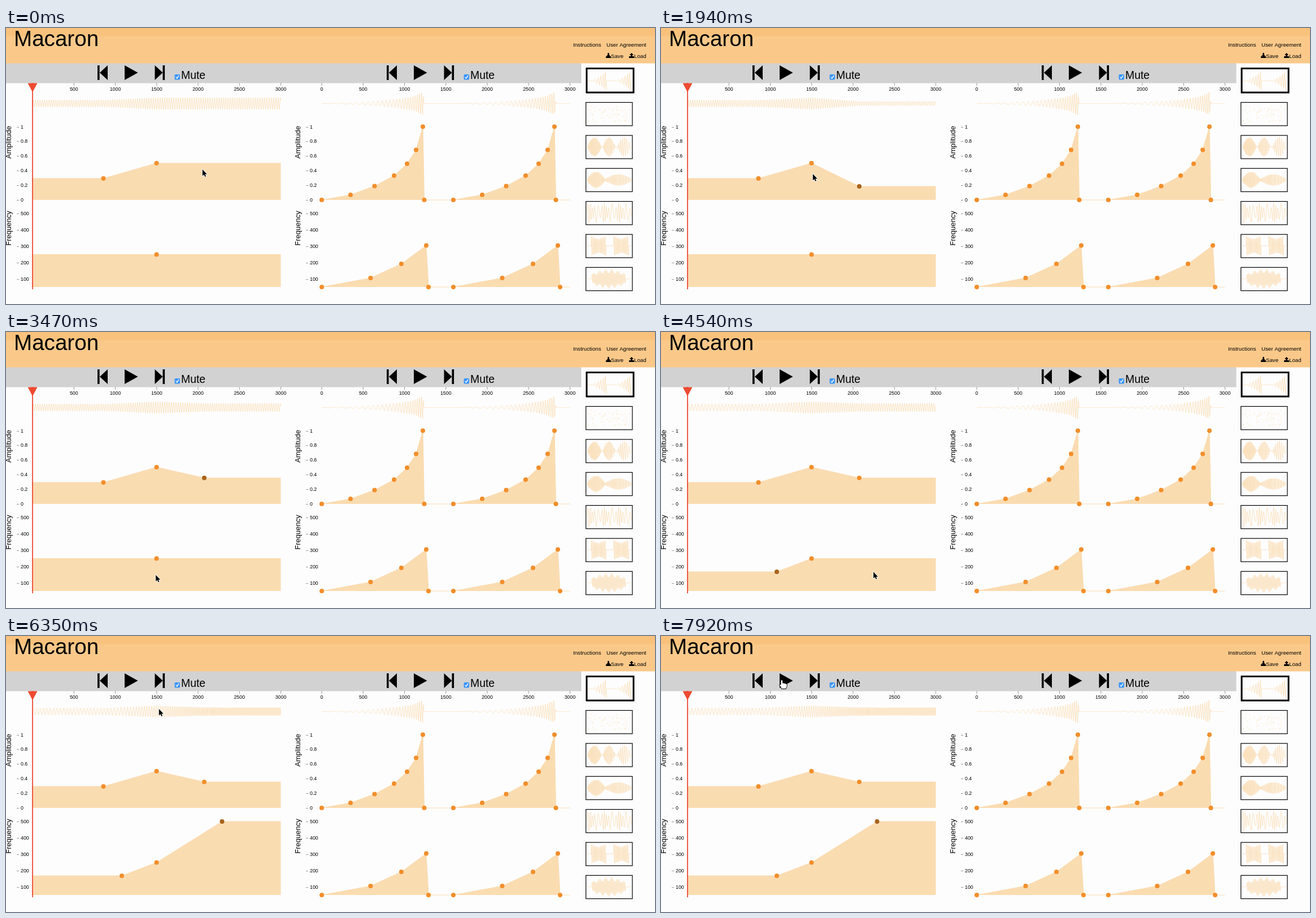
Write an HTML page with a canvas that moves like this. It is 1149 px wide and 488 px high and loops after 8 s.

```html
<!DOCTYPE html>
<html lang="en">
<head>
<meta charset="utf-8">
<style>
html, body { margin: 0; width: 100%; height: 100%; overflow: hidden; background: #fdfdfd; }
canvas { display: block; }
</style>
</head>
<body>
<canvas id="stage" width="1149" height="488"></canvas>
<script>
const g = document.getElementById('stage').getContext('2d');
const LOOP = 8000, X0 = 47, X1 = 486.5, PANEL = 512, LAG = 90;
const AMP0 = 304, AMP_H = 129.5, FREQ0 = 458, HZ = 0.289;
const FILL = '#fadcb1', DOT = '#f28e2b', DARK = '#a9631c';

// Pointer moves: start, end, and the place reached
const moves = [
  [0, 1, 347, 249], [870, 1400, 351, 280], [1900, 1940, 268, 257],
  [2000, 2400, 159, 212], [2600, 2680, 271, 229], [2740, 3050, 351, 258],
  [3200, 3500, 262, 433], [3650, 4100, 205, 424], [4360, 4565, 382, 423],
  [5420, 6060, 377, 309], [6230, 6340, 270, 128], [6530, 6820, 217, 90],
  [6990, 7740, 213, 77]
];

const clamp = (v, lo, hi) => Math.min(hi, Math.max(lo, v));

function pointerAt(t) {
  let [, , x, y] = moves[0];
  for (const [from, to, toX, toY] of moves) {
    const u = clamp((t - from) / (to - from), 0, 1), e = u * u * (3 - 2 * u);
    x += (toX - x) * e;
    y += (toY - y) * e;
  }
  return [x, y];
}

function level(pts, x) {
  if (x <= pts[0][0]) return pts[0][1];
  for (let i = 1; i < pts.length; i++) {
    const [a, b] = [pts[i - 1], pts[i]];
    if (x <= b[0]) return a[1] + (b[1] - a[1]) * (x - a[0]) / (b[0] - a[0]);
  }
  return pts[pts.length - 1][1];
}

const rect = (color, x, y, w, h) => { g.fillStyle = color; g.fillRect(x, y, w, h); };

function poly(color, ...pts) {
  g.fillStyle = color;
  g.beginPath();
  for (const p of pts) g.lineTo(p[0], p[1]);
  g.closePath();
  g.fill();
}

function line(color, width, ...pts) {
  g.strokeStyle = color;
  g.lineWidth = width;
  g.beginPath();
  for (const p of pts) g.lineTo(p[0], p[1]);
  g.stroke();
}

function text(s, x, y, size, align = 'left') {
  g.font = size + 'px "Liberation Sans", Arial, sans-serif';
  g.textAlign = align;
  g.fillStyle = '#000';
  g.fillText(s, x, y);
}

// amp is a height in pixels, rate the number of cycles per pixel
function wave(from, to, mid, amp, rate) {
  const step = 0.25, pts = [];
  let phase = 0;
  for (let x = from; x <= to; x += step) {
    pts.push([x, mid - amp(x) * Math.sin(phase)]);
    phase += 2 * Math.PI * rate(x) * step;
  }
  line('#fad7a6', 0.7, ...pts);
}

function curve(pts, from, to, base) {
  const edge = [[from, level(pts, from)], ...pts, [to, level(pts, to)]];
  poly(FILL, [from, base], ...edge, [to, base]);
  line(FILL, 1, ...edge);
  for (const [x, y, dark] of pts) {
    g.fillStyle = dark ? DARK : DOT;
    g.beginPath();
    g.arc(x, y, 4, 0, 7);
    g.fill();
  }
}

function signal(dx, amps, freqs) {
  const from = X0 + dx, to = X1 + dx;
  wave(from, to, 133.5, x => (AMP0 - level(amps, x)) / AMP_H * 20.5,
    x => (50 + (FREQ0 - level(freqs, x)) / HZ) / 1000);
  curve(amps, from, to, AMP0);
  curve(freqs, from, to, FREQ0);
}

function sideways(s, x, y) {
  g.save();
  g.translate(x, y);
  g.rotate(-Math.PI / 2);
  text(s, 0, 0, 13, 'center');
  g.restore();
}

function panel(dx) {
  g.save();
  g.translate(dx, 0);
  rect('#000', 162, 66, 3.6, 26);
  poly('#000', [166, 79], [180, 66], [180, 92]);
  poly('#000', [210, 66], [233.5, 79], [210, 92]);
  poly('#000', [263.5, 66], [277.5, 79], [263.5, 92]);
  rect('#000', 277.5, 66, 3.6, 26);
  g.fillStyle = '#3b94f7';
  g.beginPath();
  g.roundRect(298.5, 82, 9.5, 9.5, 2);
  g.fill();
  line('#fff', 1.4, [300.8, 87], [302.7, 89.2], [306, 84]);
  text('Mute', 310, 90, 19.4);

  for (let ms = dx ? 0 : 500; ms <= 3000; ms += 500) {
    const x = X0 + ms * 0.1465;
    rect('#999', x - 0.5, 97, 1, 5);
    text(ms, x, 111, 8.8, 'center');
  }
  const mark = (label, y) => {
    rect('#999', 19, Math.round(y), 4, 1);
    text(label, 26, y + 3, 8.8);
  };
  for (let i = 0; i <= 5; i++) mark(i / 5, AMP0 - i / 5 * AMP_H);
  for (let f = 100; f <= 500; f += 100) mark(f, FREQ0 - (f - 50) * HZ);
  sideways('Amplitude', 9, 202);
  sideways('Frequency', 9, 354);
  g.restore();
}

function trayIcon(x, up) {
  rect('#000', x, 50, 9, 3);
  rect('#000', x + 3.3, up ? 47 : 44, 2.4, 4);
  poly('#000', [x + 1, 48], [x + 8, 48], [x + 4.5, up ? 44 : 51.5]);
}

function header() {
  rect('#d2d2d2', 0, 62, 1018.5, 35.5);
  rect('#fac98a', 0, 0, 1149, 62.5);
  rect('#f9c27c', 0, 0, 1149, 15);
  text('Macaron', 14, 32, 38.6);
  text('Instructions', 1004, 32.5, 9.7);
  text('User Agreement', 1063, 32.5, 9.7);
  text('Save', 1071, 52.5, 9.7);
  text('Load', 1112, 52.5, 9.7);
  trayIcon(1062, false);
  trayIcon(1103, true);
}

// Thumbnails: envelope and rate over u = 0..1
const hump = (u, a, b) => u > a && u < b ? Math.sin(Math.PI * (u - a) / (b - a)) : 0;
const burst = u => u % 0.56 < 0.43 ? (u % 0.56 / 0.43) ** 2 : 0;
const pinch = u => {
  const v = (u - 0.09) % 0.515 / 0.335;
  return v > 0 && v < 1 ? 0.7 + 0.3 * Math.abs(2 * v - 1) : 0;
};
const barrel = u => u > 0.1 && u < 0.87
  ? (0.5 + 0.45 * hump(u, 0.1, 0.87)) * (0.85 + 0.2 * Math.sin(u * 200)) : 0;
const thumbs = [
  [burst, u => 0.15 + 0.15 * burst(u)],
  null,
  [u => hump(u, 0, 0.33) + hump(u, 0.35, 0.64) + hump(u, 0.68, 1), u => 0.7 - 0.5 * u],
  [u => 0.15 + 0.7 * hump(u, 0, 0.4) + 0.45 * Math.abs(hump(u, 0.42, 1)), u => 0.65 - 0.3 * u],
  [u => 0.75 + 0.25 * Math.sin(u * 37), u => 0.2 + 0.08 * Math.sin(u * 19)],
  [pinch, () => 0.45],
  [barrel, () => 0.5]
];

function specks(y) {
  let seed = 7;
  const rnd = () => (seed = seed * 16807 % 2147483647) / 2147483647;
  for (let n = 0; n < 65; n++) rect('#fae5c6', 1030 + rnd() * 73, y + 5 + rnd() * 29, 1, 2);
}

function gallery() {
  thumbs.forEach((thumb, i) => {
    const y = 73.5 + i * 58.35, u = x => (x - 1029) / 78;
    if (thumb) wave(1029, 1107, y + 20, x => 17 * thumb[0](u(x)), x => thumb[1](u(x)));
    else specks(y);
    g.strokeStyle = '#000';
    g.lineWidth = i ? 1.2 : 3;
    if (i) g.strokeRect(1026.7, y - 0.3, 82.2, 41.2);
    else g.strokeRect(1028, 71.5, 83, 42.5);
  });
}

const burstAmp = [[559, 304], [610, 295], [652.5, 279.5], [687, 261], [710, 240],
  [726, 215.5], [738, 174.5], [740.5, 304]];
const burstFreq = [[559, 458], [645.5, 442], [700, 417], [744, 384.5], [748, 458]];
const twice = pts => [...pts, ...pts.map(([x, y]) => [x + 233, y])];

const arrow = new Path2D('M0 0V11.5L2.7 9.2L4.4 13L6.2 12.2L4.6 8.6H8Z');
const finger = new Path2D('M-1.3 1Q0-1 1.3 1V6Q3 4.6 4 6.2Q6 5 6.6 6.8Q9 6.2 9 8.5' +
  'Q9 12 7 15H0Q-1 12-3.8 9Q-4 7-1.3 8.6Z');

function cursor(x, y) {
  const hand = y < 89;
  const shape = hand ? finger : arrow;
  g.save();
  g.translate(x + 0.8, y + 1);
  g.lineJoin = 'round';
  g.lineWidth = 1.8;
  g.strokeStyle = hand ? '#000' : '#fff';
  g.fillStyle = hand ? '#fff' : '#000';
  g.stroke(shape);
  g.fill(shape);
  g.restore();
}

function draw(t) {
  const amps = [[172.5, 266], [266.5, 239]];
  const freqs = [[266.5, 400.5]];
  // Dragged points trail behind the pointer
  if (t >= 60) amps.push([...pointerAt(Math.min(t, 3200) - LAG), t < 3700]);
  if (t >= 4280) freqs.push([205, 424, t < 4700]);
  if (t >= 5370) freqs.push([382.5, Math.max(328, pointerAt(Math.min(t, 6200) - LAG)[1]), true]);
  const byX = (a, b) => a[0] - b[0];

  rect('#fdfdfd', 0, 0, 1149, 488);
  header();
  panel(0);
  panel(PANEL);
  signal(0, amps.sort(byX), freqs.sort(byX));
  signal(PANEL, twice(burstAmp), twice(burstFreq));
  gallery();
  rect('#ee4a32', 46.1, 97, 1.8, 365);
  poly('#ee4a32', [38.5, 97.5], [55.5, 97.5], [47, 113.5]);
  cursor(...pointerAt(t));
}

const start = performance.now();
function tick() {
  draw((performance.now() - start) % LOOP);
  requestAnimationFrame(tick);
}
tick();
</script>
</body>
</html>
```
